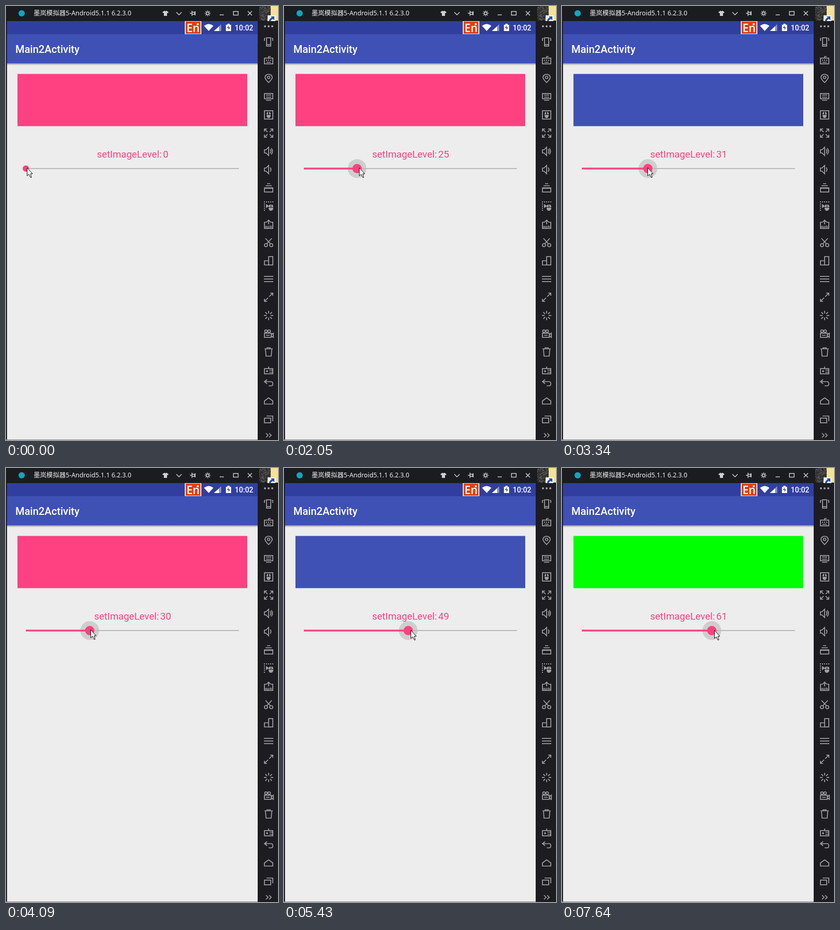
Animation of 522x833 px, one loop 8000 ms. Source, as an HTML page with a canvas:

```html
<!DOCTYPE html>
<html lang="zh">
<head>
<meta charset="utf-8">
<title>Level list demo</title>
<style>
html, body { margin: 0; width: 100%; height: 100%; overflow: hidden; background: #1c1c21; }
canvas { display: block; }
</style>
</head>
<body>
<canvas id="stage" width="522" height="833"></canvas>
<script>
const LOOP = 8000;
const LAG = 35; // the thumb trails the pointer, ms
const PINK = '#ff4081', BLUE = '#3f51b5', GREEN = '#00ff00';
const DARK = '#1c1c21', GREY = '#a0a0a2', WHITE = '#fff';
const TRACK = { x: 38, y: 312, w: 409 };
const GRAB = 40; // pointer x at level 0

const stage = document.getElementById('stage').getContext('2d');
const backdrop = document.createElement('canvas');
backdrop.width = 522;
backdrop.height = 833;
let g = backdrop.getContext('2d');

// Motion

const linear = u => u;
const easeIn = u => u ** 1.5;
const easeOut = u => 1 - (1 - u) ** 2.3;

const drags = [
  { from: 960, to: 1750, x: 110, ease: easeIn },
  { from: 1780, to: 2540, x: 164, ease: easeOut },
  { from: 2590, to: 2810, x: 171, ease: linear },
  { from: 3250, to: 3370, x: 162, ease: linear },
  { from: 4090, to: 4140, x: 168, ease: linear },
  { from: 4820, to: 5620, x: 266, ease: linear },
  { from: 5810, to: 6060, x: 282, ease: linear },
  { from: 6340, to: 6400, x: 285, ease: easeOut },
  { from: 7170, to: 7170, x: 287, ease: linear },
  { from: 7350, to: 7490, x: 290, ease: linear },
  { from: 7640, to: 7640, x: 291.5, ease: linear }
];

function pointerAt(t) {
  let x = GRAB;
  for (const d of drags) {
    if (t < d.from) break;
    const u = t < d.to ? (t - d.from) / (d.to - d.from) : 1;
    x += (d.x - x) * d.ease(u);
  }
  return x;
}

function levelAt(t) {
  return Math.round((pointerAt(t - LAG) - GRAB) / TRACK.w * 100);
}

// Drawing helpers

function rect(x, y, w, h, color) {
  g.fillStyle = color;
  g.fillRect(x, y, w, h);
}

function disc(x, y, r, color = g.fillStyle) {
  g.fillStyle = color;
  g.beginPath();
  g.arc(x, y, r, 0, Math.PI * 2);
  g.fill();
}

function ring(x, y, r) {
  g.beginPath();
  g.arc(x, y, r, 0, Math.PI * 2);
  g.stroke();
}

function text(str, x, y, font, color, align = 'left') {
  g.font = font;
  g.fillStyle = color;
  g.textAlign = align;
  g.fillText(str, x, y);
}

const line = d => g.stroke(new Path2D(d));
const fill = d => g.fill(new Path2D(d));
const box = (x, y, w, h) => g.strokeRect(x, y, w, h);

function turns(n, paint) {
  for (let i = 0; i < n; i++) {
    paint();
    g.rotate(Math.PI * 2 / n);
  }
}

function mirrored(paint) {
  paint();
  g.scale(-1, 1);
  paint();
}

function icon(x, y, paint, color = GREY, width = 1.7) {
  g.save();
  g.translate(x, y);
  g.strokeStyle = g.fillStyle = color;
  g.lineWidth = width;
  paint();
  g.restore();
}

// Side bar icons, top to bottom

function speaker() {
  line('M-8-3H-5L0-8V8L-5 3H-8Z');
  line('M3-4Q6 0 3 4');
}

const tools = [
  function shake() {
    box(-4, -8, 8, 16);
    line('M-4 5H4');
    mirrored(() => line('M8-7V-2M8-7H6'));
  },
  function keyboard() {
    box(-8, -4, 16, 11);
    line('M0-4V-7H4M-4 4H4');
    for (let x = -5; x <= 3; x += 4) g.fillRect(x, -1, 2, 2);
  },
  function place() {
    line('M0 8Q-7 1-7-2A7 6 0 0 1 7-2Q7 1 0 8Z');
    ring(0, -2, 2.5);
  },
  function monitor() {
    box(-8, -6, 16, 10);
    line('M-5-3H5M-5 1H5M-5 7H5');
  },
  function mouseBox() {
    box(-8, -8, 16, 16);
    mirrored(() => fill('M1-1V-6Q4-6 4-1Z'));
    fill('M-4 0H4Q4 6 0 6Q-4 6-4 0Z');
  },
  function expand() {
    turns(4, () => line('M-8-3V-8H-3M-7-7L-2-2'));
  },
  function louder() {
    speaker();
    line('M5-6Q10 0 5 6');
  },
  speaker,
  function stack() {
    box(-8, 0, 16, 8);
    line('M-8 1H8M-6-4H6M-3-8H3');
  },
  function macro() {
    for (let i = -8; i <= 8; i += 4) {
      g.fillRect(i - 1, -9, 2, 2);
      g.fillRect(-9, i - 1, 2, 2);
    }
    fill('M-5-4L1 0L-5 4Z');
    fill('M0 2Q0-3 4-3V2ZM5 2V-3Q9-3 9 2ZM0 3H9Q9 9 4 9Q0 9 0 3Z');
  },
  function install() {
    line('M-4-4H-8V8H8V-4H4M0 0V-8M-4-4L0-8L4-4');
    text('apk', 0, 7, "bold 8px 'Liberation Sans', sans-serif", GREY, 'center');
  },
  function scissors() {
    mirrored(() => {
      line('M-6-8L4 3');
      ring(5, 5, 3);
    });
  },
  function rotate() {
    box(0, -8, 8, 16);
    line('M0 0H-8V8H0');
  },
  function menu() {
    for (let y = -5; y <= 5; y += 5) line(`M-9 ${y}H9`);
  },
  function resize() {
    turns(2, () => line('M3-8H8V-3M8-8L1-1'));
  },
  function spinner() {
    turns(8, () => line('M0-4V-9'));
  },
  function camera() {
    box(-8, -1, 13, 8);
    line('M5 2L9-1V7L5 4M-5 3H2');
    ring(-5, -5, 2.5);
    ring(1, -5, 2.5);
  },
  function trash() {
    line('M-8-6H8M-3-6V-8H3V-6M-6-5L-5 8H5L6-5');
  },
  function gamepad() {
    box(-8, -3, 16, 10);
    line('M0-3V-7M-5 2H-1M-3 0V4');
    turns(1, () => { for (const x of [2, 5]) for (const y of [-1, 3]) g.fillRect(x, y, 2, 2); });
  }
];

const navigation = [
  () => line('M-3-6L-8-2L-3 2M-8-2H5Q8-2 8 2Q8 6 5 6H0'),
  () => line('M-8 6V0L0-6L8 0V6Z'),
  () => { box(-8, -2, 12, 9); line('M-4-6H8V4'); }
];

function sideBar() {
  rect(483, 29, 39, 804, DARK);
  icon(504, 39, () => { for (let x = -7; x <= 7; x += 7) disc(x, 0, 2); });
  tools.forEach((paint, i) => icon(504, 69 + 35 * i, paint));
  navigation.forEach((paint, i) => icon(504, 723 + 35 * i, paint));
  icon(504, 824, () => line('M-5-4L-1 0L-5 4M1-4L5 0L1 4'));
}

// Fixed surroundings

function desktopCorner() {
  let seed = 7;
  for (let y = 0; y < 28; y += 2) {
    for (let x = 486; x < 508; x += 2) {
      seed = seed * 16807 % 2147483647;
      const v = 35 + seed % 55;
      rect(x, y, 2, 2, `rgb(${v},${v},${v})`);
    }
  }
  rect(508, 0, 14, 28, '#f6e19b');
  rect(502, 18, 15, 11, '#f4f6fb');
  icon(509, 24, () => fill('M-1-4H6V3L3 1Q0 2-1 5H-4Q-4 0 1-2Z'), '#2450a0');
}

function titleBar() {
  rect(0, 0, 486, 29, '#1b1c20');
  disc(30, 14, 6, '#12a5bd');
  text('墨岚模拟器5-Android5.1.1 6.2.3.0', 53, 18,
    "12.3px 'Noto Sans', 'Noto Sans CJK SC', 'Noto Sans CJK', sans-serif", '#f0f0f0');
  const button = (x, paint) => icon(x, 14, paint, '#d0d0d2', 1.4);
  button(306, () => fill('M-2-5Q0-3 2-5L6-2L4 0L3-1V5H-3V-1L-4 0L-6-2Z'));
  button(332, () => line('M-5-2L0 3L5-2'));
  button(359, () => line('M-6 0H-2M-2-5V5M-2-2H3V2H-2M4-4V4'));
  button(387, () => { ring(0, 0, 2.5); turns(8, () => line('M0-3.5V-5.5')); });
  button(414, () => line('M-4 3H4'));
  button(441, () => box(-4.5, -3.5, 9, 7));
  button(468, () => turns(4, () => line('M0 0L4 4')));
}

function statusBar() {
  rect(2, 29, 481, 25, '#303f9f');
  rect(343, 29, 32, 25, '#f3d9d2');
  rect(345, 30, 28, 23, '#e0400f');
  text('En', 359, 50, "600 21px 'Open Sans', sans-serif", WHITE, 'center');
  disc(368, 35, 2, WHITE);
  icon(389, 48, () => fill('M0 0L-9-10Q0-17 9-10Z'), WHITE);
  icon(399, 48, () => fill('M0 0L14-13V0Z'), '#8790c7');
  icon(399, 48, () => fill('M0 0L10-9V0Z'), WHITE);
  icon(427, 41, () => fill('M-5-5H-2V-7H2V-5H5V7H-5Z'), WHITE);
  icon(427, 41, () => fill('M1-4L-3 1H0V5L3 0H0Z'), '#303f9f');
  text('10:02', 439, 47, '500 14px Roboto, sans-serif', WHITE);
}

function toolBar() {
  rect(2, 54, 481, 56, BLUE);
  const shade = g.createLinearGradient(0, 110, 0, 114);
  shade.addColorStop(0, 'rgba(0,0,0,.36)');
  shade.addColorStop(1, 'rgba(0,0,0,0)');
  rect(2, 110, 481, 4, shade);
  text('Main2Activity', 18, 90, '500 20px Roboto, sans-serif', WHITE);
}

function drawBackdrop() {
  rect(0, 0, 522, 833, DARK);
  titleBar();
  desktopCorner();
  rect(2, 29, 481, 803, '#ededed');
  statusBar();
  toolBar();
  sideBar();
  rect(0, 832, 483, 1, '#8c8c8e');
}

// Moving parts

function drawPointer(x, y) {
  icon(x, y, () => {
    const arrow = 'M.5 .5V16L4 13L7 19H9L7 12H11Z';
    fill(arrow);
    g.strokeStyle = '#111';
    line(arrow);
  }, WHITE, 1);
}

function draw(t) {
  const level = levelAt(t);
  const press = Math.min(1, Math.max(0, (t - 1000) / 180));
  const { x, y, w } = TRACK;
  const thumb = x + w * level / 100;

  g.drawImage(backdrop, 0, 0);
  rect(22, 130.4, 441, 100.2, level > 60 ? GREEN : level > 30 ? BLUE : PINK);
  g.wordSpacing = '-2px';
  text('setImageLevel: ' + level, 243, 291, '18.5px Roboto, sans-serif', PINK, 'center');

  disc(thumb, y, 18 * press, `rgba(0,0,0,${0.13 * press})`);
  rect(x, y - 1, w, 2, '#bababa');
  rect(x, y - 1.7, thumb - x, 3.4, PINK);
  disc(thumb, y, 6 + 3 * press, PINK);
  drawPointer(Math.round(pointerAt(t)), t < 5400 ? 310 : 311);
}

drawBackdrop();
g = stage;
const start = performance.now();
function tick() {
  draw((performance.now() - start) % LOOP);
  requestAnimationFrame(tick);
}
tick();
</script>
</body>
</html>
```
